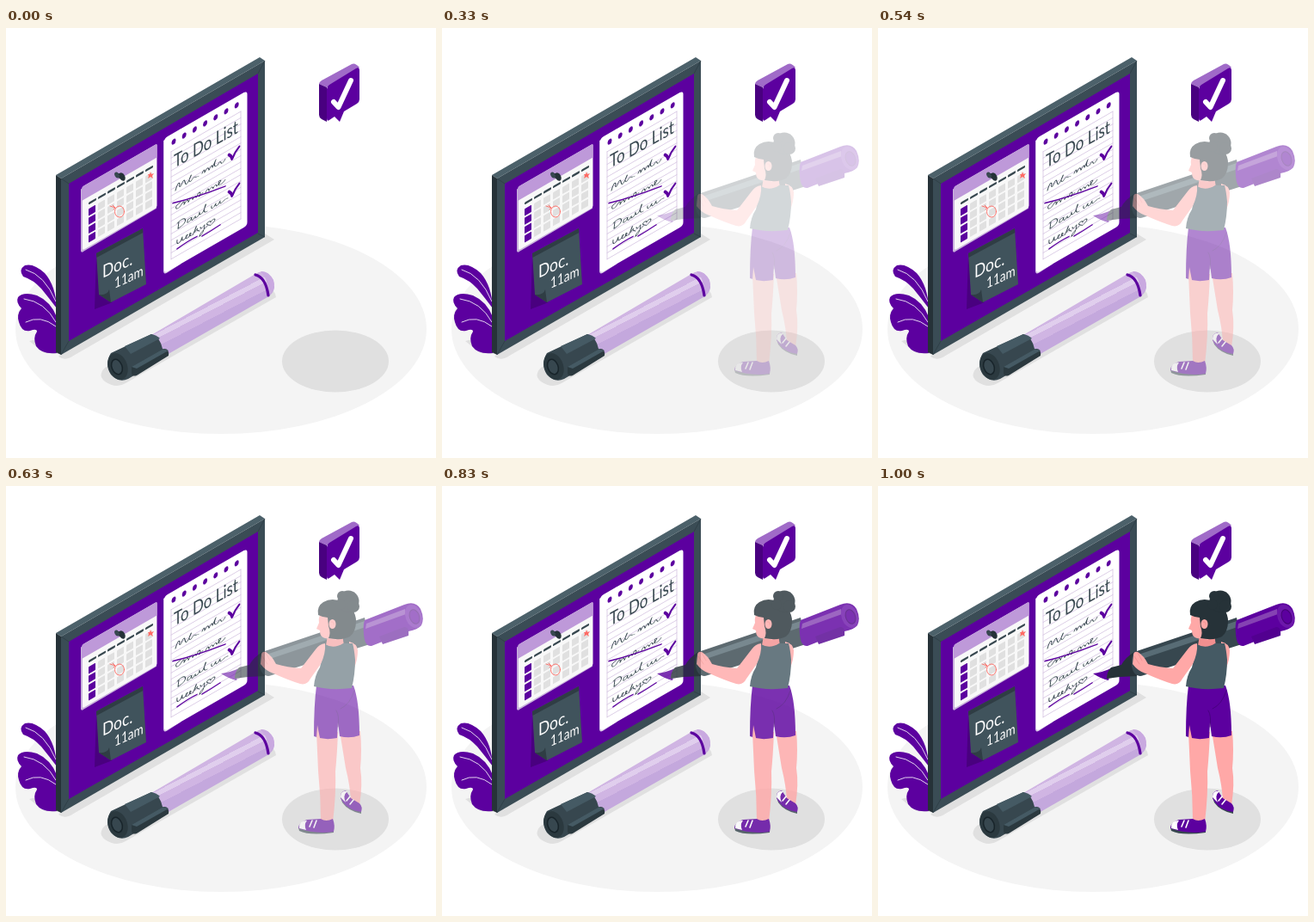
An HTML page that plays this animation: 500x500 px, repeating every 1040 ms.

```html
<!DOCTYPE html>
<html lang="en">
<head>
<meta charset="utf-8">
<title>To do board</title>
<style>
html, body { margin: 0; width: 100%; height: 100%; overflow: hidden; background: #fff; }
svg { display: block; width: 100vw; height: 100vh; }
text { font-family: Lato, "Open Sans", sans-serif; }
.line { fill: none; stroke-linecap: round; stroke-linejoin: round; }
</style>
</head>
<body>
<svg viewBox="0 0 500 500">
  <defs>
    <linearGradient id="tube" x1="230" y1="320" x2="243" y2="345" gradientUnits="userSpaceOnUse">
      <stop offset="0" stop-color="#d0b5e3"/><stop offset=".2" stop-color="#d0b5e3"/>
      <stop offset=".2" stop-color="#e0ceed"/><stop offset=".4" stop-color="#e0ceed"/>
      <stop offset=".4" stop-color="#d0b5e3"/><stop offset=".7" stop-color="#d0b5e3"/>
      <stop offset=".7" stop-color="#c4a8dd"/>
    </linearGradient>
  </defs>

  <ellipse cx="250" cy="350" rx="239" ry="122" fill="#f4f4f4"/>
  <g fill="#e0e0e0">
    <path d="M63 380L301 239L312 246L75 383Q68 387 61 382Z"/>
    <path d="M27 364Q38 359 58 370L61 379L45 378Z"/>
    <path d="M111 401Q113 394 125 390L300 297Q313 304 314 313L139 413Q128 420 115 411Q109 406 111 401Z"/>
    <ellipse cx="383" cy="387.500" rx="62" ry="36"/>
  </g>

  <g id="plant">
    <path d="M59 326Q58 300 45 285Q32 273 22 276Q14 281 20 289Q32 293 41 303Q50 314 59 326Z" fill="#5c009f"/>
    <path d="M59 336Q52 318 36 311Q20 306 14 313Q11 319 18 326Q12 333 15 342Q18 354 28 352Q36 349 36 353Q31 360 35 370Q42 380 59 378Z" fill="#5c009f"/>
    <path class="line" d="M23 281Q45 287 58 318M21 315Q45 318 58 342M23 342Q40 333 58 347" stroke="#e4d5ef" stroke-width="1"/>
  </g>

  <g id="board">
    <path d="M58 171L295 34L301 38L64 175Z" fill="#4c616a"/>
    <path d="M58 171L64 175V380L58 377Z" fill="#263238"/>
    <path d="M64 175L301 38V243L64 380Z" fill="#3a4c55"/>
    <path d="M64 175L73 181M301 38L293 53M293 239L301 243M64 380L73 364" stroke="#2c3b42" stroke-width=".7"/>
    <path d="M73 181L293 53V238L73 364Z" fill="#5c009f"/>
  </g>

  <g id="calendar" transform="matrix(1 -.577 0 1 88 185)">
    <path d="M-1 2V74Q0 77 3 76L87 75V1Z" fill="#c9b2dc"/>
    <rect x="1" width="86.500" height="74" rx="2" fill="#f8f8f8"/>
    <path d="M0 2Q0 0 2 0H86Q87.500 0 87.500 2V16H0Z" fill="#be99d9"/>
    <g id="days"></g>
  </g>
  <g class="line" stroke="#ff6b65" stroke-width=".9">
    <ellipse cx="132" cy="213.500" rx="5.500" ry="6.500"/>
    <path d="M121 207L127 209M124 206L127 209L125 211"/>
    <path d="M168 167L169 170L172 169L170 172L171 175L168 173L165 175L166 172L165 170L167 170Z" fill="#ff6b65" stroke="none"/>
  </g>
  <g id="pin" fill="#263238">
    <ellipse cx="135" cy="173" rx="3.300" ry="5" transform="rotate(-28 135 173)"/>
    <path d="M128 169L134 169L136 176L130 174Z"/>
    <ellipse cx="129" cy="171" rx="2.500" ry="3.700" transform="rotate(-28 129 171)" fill="#37474f"/>
  </g>

  <g id="note">
    <path d="M105 263L103 327L124 319L109 310Z" fill="#49007f"/>
    <path d="M105 262L159 233L163 298L122 319L108 310Z" fill="#40535c"/>
    <path d="M105 262L159 233L159.300 238L105.300 267Z" fill="#2f3d44"/>
    <path d="M108 310Q118 311 120 304L122 319Z" fill="#2f3d44"/>
    <g fill="#fff">
      <text font-size="20.500" transform="matrix(.85 -.39 0 1 112 291)">Doc.</text>
      <text font-size="17" transform="matrix(.8 -.36 0 1 126 303)">11am</text>
    </g>
  </g>

  <g id="paper" transform="matrix(1 -.577 0 1 183 129)">
    <path d="M0 2V153Q0 158 4 158L20 157V0Z" fill="#d9c8e8"/>
    <rect x="1" width="96.500" height="157" rx="4" fill="#fff"/>
    <g id="rules" class="line" stroke="#cdb9dc" stroke-width=".6"></g>
    <g id="holes" fill="#5c009f"></g>
    <text font-size="21.500" fill="#37474f" transform="matrix(.79 .02 0 1 12 41)">To Do List</text>
    <g class="line" stroke="#37474f" stroke-width="1">
      <path transform="matrix(1 0 0 .68 0 22)" d="M14 68Q17 54 19 60Q18 69 21 64Q24 54 25 62T28 67Q34 55 32 57Q28 66 32 67Q35 62 37 64T41 66M45 65Q48 56 48 66Q52 56 53 66Q57 56 57 65Q62 52 61 55Q57 67 63 66Q66 60 67 65T72 63"/>
      <path transform="matrix(1 0 0 .68 0 29)" d="M20 82Q13 84 15 89Q17 93 22 86Q25 82 24 90Q29 81 29 90Q34 81 34 90Q38 83 38 90Q42 80 43 87Q39 95 46 88M49 91Q52 82 53 91Q56 83 58 91Q61 83 62 91Q66 89 67 85Q64 82 64 90Q67 94 72 88"/>
      <path transform="matrix(1 0 0 .68 0 38)" d="M18 101L17 112Q28 110 25 102Q22 98 16 102M33 106Q27 104 28 111Q31 113 33 106Q32 113 35 111Q38 104 37 111Q42 111 42 105Q42 113 46 108Q51 96 49 98Q45 112 51 111M56 106Q55 113 59 110L61 106Q60 113 64 110L66 106Q65 113 69 110T75 109"/>
      <path transform="matrix(1 0 0 .68 0 43)" d="M16 123Q15 133 20 129L22 123Q21 133 26 128Q30 124 27 124Q24 130 29 130Q34 126 31 124Q29 130 34 130Q40 117 38 119Q34 131 38 125Q41 122 39 126L42 130M43 124Q43 130 48 124Q47 139 42 139Q42 134 51 129M55 131Q48 125 52 123Q55 123 55 126Q58 121 60 125Q60 129 55 131Z"/>
    </g>
    <path class="line" d="M11 81Q38 90 72 96.500M16 137Q29 135 39 136M45 139Q56 139 66 138" stroke="#5c009f" stroke-width="1.500"/>
    <path id="ticks" class="line" d="M76 62Q79 65 80 69.500Q83 63 88 60M76 105Q79 108 80 112.500Q83 106 88 103" stroke="#5c009f" stroke-width="2.800"/>
  </g>

  <g id="floorMarker">
    <path d="M169 357L290 286Q297 281 304 285Q313 292 312 302Q311 309 304 313L187 380Z" fill="url(#tube)"/>
    <path d="M296 283Q305 282 311 293Q314 304 306 311Q307 295 296 283Z" fill="#c9a9e0"/>
    <path class="line" d="M290 287Q302 290 305 311" stroke="#5c009f" stroke-width="3.200"/>
    <path d="M122 378L169 356Q179 359 182 373L188 381L142 408Q131 413 122 403Q114 391 122 378Z" fill="#37474f"/>
    <path d="M138 370L169 356Q175 357 179 361L145 379Z" fill="#455a64"/>
    <ellipse cx="130" cy="393.500" rx="11" ry="16" transform="rotate(-20 130 393.500)" fill="#2b393f"/>
    <ellipse cx="129" cy="394" rx="6" ry="9" transform="rotate(-20 129 394)" fill="#37474f" stroke="#18242a" stroke-width="1.500"/>
    <path d="M146 394L183 373Q190 372 189 381L152 404Q146 406 146 401Z" fill="#2b393f"/>
    <path d="M146 394L183 373L189 375L152 396Z" fill="#455a64"/>
  </g>

  <g id="bubble">
    <path d="M364 65Q364 63 367 61L402 42Q406 40 411 46L373 69Z" fill="#a06bc8"/>
    <path d="M364 65L373 69V109L367 106Q364 104 364 101Z" fill="#490080"/>
    <path d="M373 71Q373 68 376 66L407 47Q411 45 411 49V83Q411 86 408 88L393 97L388 109L382 103L376 107Q373 109 373 105Z" fill="#5c009f"/>
    <path class="line" d="M381 86L386.500 92L401 61" stroke="#fff" stroke-width="6"/>
  </g>

  <g id="woman" opacity="0">
    <g id="bigMarker">
      <path d="M250 218Q260 217 271 212L268 226Q259 224 250 218Z" fill="#5c009f"/>
      <path d="M271 211L283 208Q288 199 298 193L301 221L281 222L266 224Q266 216 271 211Z" fill="#263238"/>
      <path d="M298 193L417 153L423 184L309 220Q298 224 295 210Q294 198 298 193Z" fill="#37474f"/>
      <path d="M300 197L417 157L418 164L301 203Z" fill="#586c75"/>
      <path d="M417 156L463 138Q476 133 482 143Q487 154 483 162Q479 167 468 169L425 186Q417 187 416 172Q415 161 417 156Z" fill="#5c009f"/>
      <path d="M419 160L464 143L465 149L418 166Z" fill="#8542b3"/>
      <path d="M434 175L463 164Q469 163 468 174L438 184Z" fill="#520090"/>
      <ellipse cx="474" cy="151.500" rx="9.500" ry="14" transform="rotate(-20 474 151.500)" fill="#6c17aa"/>
      <ellipse cx="475" cy="152" rx="5.500" ry="8.500" transform="rotate(-20 475 152)" fill="#5c009f" stroke="#460078"/>
    </g>

    <g id="legs" fill="#ffa8a7">
      <path d="M361 286L386 286Q385 312 383 332Q384 358 380 391Q374 396 366 389Q366 360 363 331Z"/>
      <path d="M388 285H412Q414 308 412 328Q415 347 411 371L401 366Q400 348 395 328Z"/>
    </g>
    <g id="shoes">
      <path d="M340 397L341 401Q353 407 381 403V397Z" fill="#37474f"/>
      <path d="M340 398Q340 391 350 388L366 387Q372 391 380 387Q383 395 381 402Q359 405 340 398Z" fill="#5c009f"/>
      <path d="M341 398Q340 389 350 389Q346 394 349 400Z" fill="#fff"/>
      <path d="M389 362L391 368Q398 378 413 381V376Z" fill="#37474f"/>
      <path d="M389 363Q388 355 395 354L401 363L411 369Q415 373 413 379Q396 377 389 363Z" fill="#5c009f"/>
      <path d="M389 362Q389 353 397 355Q391 360 395 368Z" fill="#fff"/>
      <path class="line" d="M353 396L356 389M358 397L361 389M396 366L400 361M400 370L404 365" stroke="#fff" stroke-width="1.600"/>
    </g>
    <path d="M361 232H404Q411 250 411 290Q400 294 388 291L386 275L385 293Q370 296 358 291Q358 255 361 232Z" fill="#5c009f"/>
    <path class="line" d="M386 280Q388 267 384 261M405 238Q400 254 389 259" stroke="#430078" stroke-width=".8"/>
    <path d="M362 278L365 293L361 293Z" fill="#ffa8a7"/>

    <path d="M399 181Q408 183 409 191Q409 202 405 211L399 198Z" fill="#ffa8a7"/>
    <path d="M374 174L391 172L393 186Q382 192 372 185Z" fill="#f28f8f"/>
    <path id="shirt" d="M371 184Q381 190 392 183L403 183Q405 190 406 202Q406 219 402 235Q377 238 358 233Q359 220 365 211Z" fill="#455a64"/>
    <path d="M371 183Q364 184 360 190L343 212Q327 211 314 207Q309 197 302 193Q297 192 297 197L296 207Q302 215 311 218Q329 226 342 230Q350 232 354 224L366 207Q372 194 371 183Z" fill="#ffa8a7"/>
    <path class="line" d="M302 194L307 203M298 198L304 207" stroke="#f28f8f" stroke-width=".8"/>

    <g id="head">
      <path d="M366 147Q363 154 364 159L361 166L365 168Q365 176 371 177L384 179L388 151Z" fill="#ffa8a7"/>
      <path d="M363 150Q361 140 369 135Q379 129 392 135Q407 143 407 157Q407 169 400 175Q391 180 375 177Q378 171 375 163L374 153Q369 153 363 150Z" fill="#263238"/>
      <g fill="#263238">
        <circle cx="398" cy="134" r="12.500"/><circle cx="391" cy="128" r="6"/>
        <circle cx="404" cy="140" r="7"/><circle cx="389" cy="138" r="6"/>
      </g>
      <ellipse cx="379.500" cy="160.500" rx="4" ry="5.500" fill="#ffa8a7"/>
      <path class="line" d="M378 158Q381 157 381 161" stroke="#f28f8f" stroke-width=".8"/>
    </g>
  </g>
</svg>
<script>
const LOOP = 1040;
const STEP = 1000 / 24;
const FADE_START = 3;
const FADE_END = 24;

const byId = id => document.getElementById(id);
const repeat = (count, draw) => Array.from({ length: count }, (_, i) => draw(i)).join('');

byId('days').innerHTML = repeat(7, col => {
  const x = 8 + col * 11;
  const cells = repeat(4, row =>
    `<rect x="${x}" y="${30 + row * 10.3}" width="8" height="8.2" rx=".6" fill="${col ? '#e0e0e0' : '#5c009f'}"/>`);
  return `<rect x="${x}" y="22.5" width="9" height="2.6" rx="1" fill="#37474f"/>${cells}`;
});

byId('rules').innerHTML = '<path d="M9 20V145M90 20V145"/>' +
  repeat(18, i => `<path d="M9 ${20 + i * 7.35}H90"/>`);

byId('holes').innerHTML = repeat(7, i =>
  `<ellipse cx="${12 + i * 12.2}" cy="10" rx="2.5" ry="3.2"/>`);

const woman = byId('woman');

// The figure fades in evenly at 24 steps per second after a short pause.
function render(time) {
  const step = Math.floor((time % LOOP + 4) / STEP);
  const shown = (step - FADE_START) / (FADE_END - FADE_START);
  woman.setAttribute('opacity', Math.max(0, Math.min(1, shown)));
}

const start = performance.now();
function tick() {
  render(performance.now() - start);
  requestAnimationFrame(tick);
}
tick();
</script>
</body>
</html>
```
